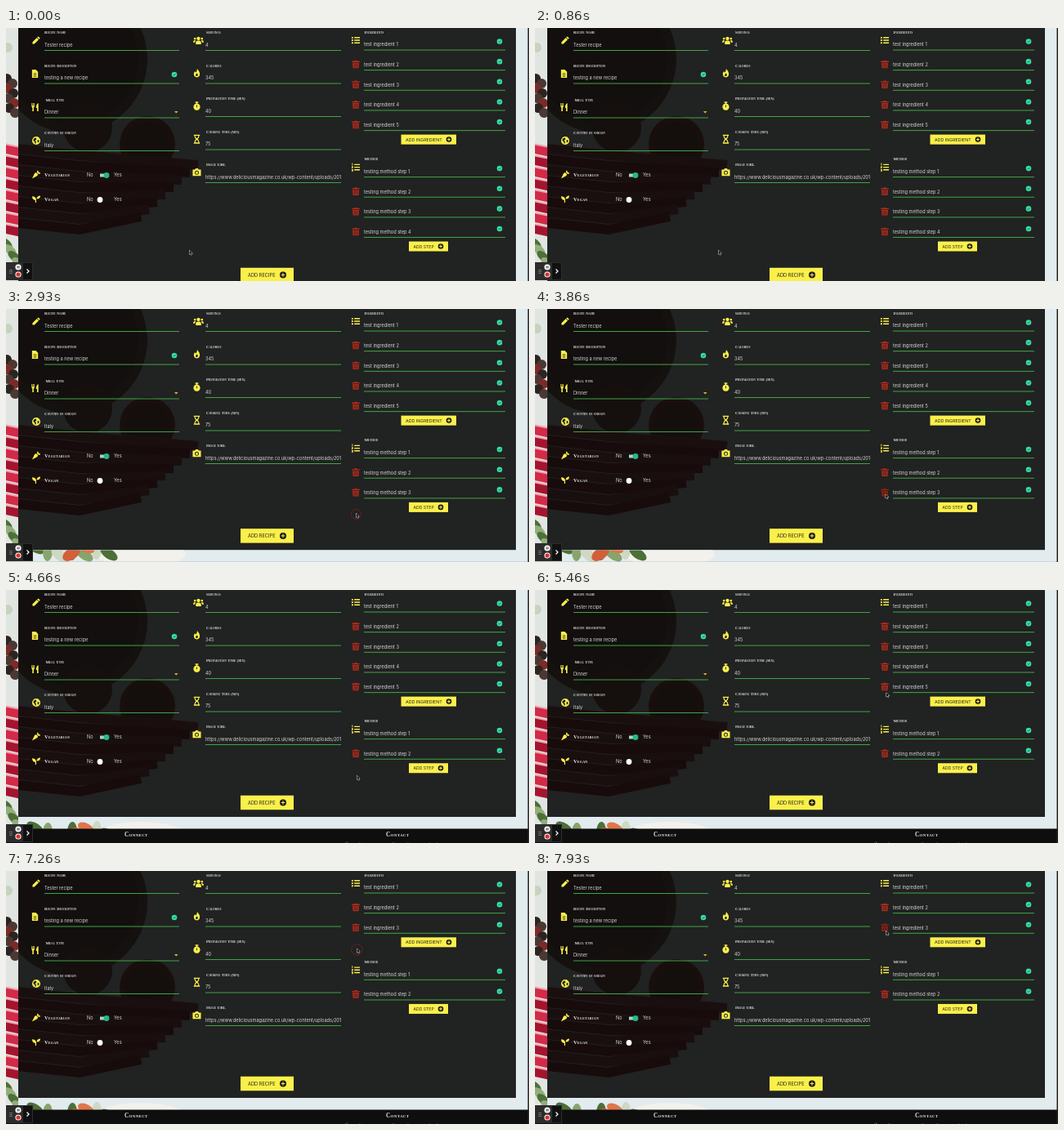
Recreate the animation shown at these times as an HTML page with a canvas. Size 640 by 310 pixels, loop 8 s.

```html
<!DOCTYPE html>
<html lang="en">
<head>
<meta charset="utf-8">
<title>Recipe form</title>
<style>
html, body { margin: 0; width: 100%; height: 100%; overflow: hidden; background: #111; }
canvas { display: block; width: 640px; height: 310px; }
</style>
</head>
<body>
<canvas id="stage"></canvas>
<script>
const W = 640, H = 310, LOOP = 8000, ROW = 24.65;
const YELLOW = '#fbf04a', GREEN = '#3fa544', TEAL = '#35dca4', TEXT = '#d4d4d4';
const SANS = 'Inter, sans-serif', SERIF = '"Liberation Serif", serif';
const canvas = document.getElementById('stage');
const ctx = canvas.getContext('2d');
const scale = window.devicePixelRatio || 1;
canvas.width = W * scale;
canvas.height = H * scale;

// Icons on a 24 unit grid
const icons = {
  pencil: 'M2 17V22h5L18.500 10.500l-5-5zM21.500 7.500a1.500 1.500 0 000-2l-3-3a1.500 1.500 0 00-2 0l-2 2 5 5z',
  file: 'M4 1h10l6 6v16H4zM8 11v1.500h8V11zM8 14.500V16h8v-1.500zM8 18v1.500h8V18z',
  fork: 'M3 1v8q0 3 2 4v10h3.500v-10q2-1 2-4V1H9v7H7.700V1H5.800v7H4.500V1zM21 1q-6 2-6 13h2.500v9H21z',
  globe: 'M12 1a11 11 0 100 22a11 11 0 100-22zM5 7l6-3 2 4-4 4 3 3-2 6-3-7-3-2zM15 11l4-1 1 4-4 4z',
  carrot: 'M1 23L8 8q4-2 7 1t0 6zM15 8q-2-4 0-7 4 1 3 5 4-1 5 3-4 3-8-1z',
  sprout: 'M1 5q10 0 11 9v8H9.500v-7Q1 14 1 5zM23 3q0 9-10 9 1-9 10-9z',
  users: 'M12 4a4 4 0 110 8a4 4 0 110-8zM6 21v-3q0-5 4-5h4q4 0 4 5v3zM4 6a2.500 2.500 0 110 5a2.500 2.500 0 110-5zM0 17q0-5 3-5h3q-2 2-2 5zM20 6a2.500 2.500 0 110 5a2.500 2.500 0 110-5zM24 17q0-5-3-5h-3q2 2 2 5z',
  fire: 'M13 0q6 6 7 13q0 10-8 10t-8-9q0-4 3-7q1 3 2 3q4-4 4-10zM12 20q4-1 3-5l-3-3q-4 3-3 6 1 2 3 2z',
  watch: 'M8 0h8v3h-2.500V5a9 9 0 11-3 0V3H8zM11 9v6h2V9z',
  glass: 'M4 0h16v3h-1.500q0 6-4 9q4 3 4 9H20v3H4v-3h1.500q0-6 4-9q-4-3-4-9H4zM8 3q0 5 4 7q4-2 4-7zM8 21h8q0-5-4-7q-4 2-4 7z',
  camera: 'M1 5h6l2-3h6l2 3h6v17H1zM12 8a5.500 5.500 0 100 11a5.500 5.500 0 100-11zM12 10a3.500 3.500 0 110 7a3.500 3.500 0 110-7z',
  bullets: 'M1 3h4v4H1zM8 3.500h15v3H8zM1 10h4v4H1zM8 10.500h15v3H8zM1 17h4v4H1zM8 17.500h15v3H8z',
  numbers: 'M2 1h2v6H2zM8 3.500h15v3H8zM1 9h4v3l-2 2h2v1H1v-2l2-2H1zM8 10.500h15v3H8zM1 17h4v6H1v-1.500h2v-1H1zM8 17.500h15v3H8z',
  trash: 'M1 3h7l1-2h6l1 2h7v3H1zM3 8h18l-1 15H4zM7 10v11h1.500V10zM11.300 10v11h1.500V10zM15.500 10v11H17V10z',
  arrow: 'M0 0V17l4-4 3 7 3-1.500-3-6.500h6z'
};
for (const name in icons) icons[name] = new Path2D(icons[name]);

function icon(name, x, y, size = 11, color = YELLOW) {
  ctx.save();
  ctx.translate(x - size / 2, y - size / 2);
  ctx.scale(size / 24, size / 24);
  ctx.fillStyle = color;
  ctx.fill(icons[name], 'evenodd');
  ctx.restore();
}

function rect(x, y, w, h, color) {
  ctx.fillStyle = color;
  ctx.fillRect(x, y, w, h);
}

function oval(x, y, rx, ry, color, turn = 0) {
  ctx.fillStyle = color;
  ctx.beginPath();
  ctx.ellipse(x, y, rx, ry, turn, 0, 7);
  ctx.fill();
}

function disc(x, y, r, color) {
  oval(x, y, r, r, color);
}

function line(points, color, width) {
  ctx.strokeStyle = color;
  ctx.lineWidth = width;
  ctx.beginPath();
  points.forEach(([x, y]) => ctx.lineTo(x, y));
  ctx.stroke();
}

// Runs paint inside a rectangle only
function clipped(x, y, w, h, paint) {
  ctx.save();
  ctx.beginPath();
  ctx.rect(x, y, w, h);
  ctx.clip();
  paint();
  ctx.restore();
}

// y is the middle of the line of text
function text(str, x, y, size = 5.6, color = TEXT, family = SANS, style = '') {
  ctx.font = `${style} ${size}px ${family}`;
  ctx.fillStyle = color;
  ctx.fillText(str, x, y + size * 0.35);
}

function caps(str, x, y, size = 4.8) {
  ctx.letterSpacing = size * 0.04 + 'px';
  text(str, x, y, size, '#e6e6e6', SERIF, 'small-caps bold');
  ctx.letterSpacing = '0px';
}

function tick(x, y) {
  disc(x, y, 3.3, TEAL);
  line([[x - 1.4, y], [x - 0.3, y + 1.1], [x + 1.5, y - 1]], '#175a45', 0.8);
}

function value(str, x, y, width) {
  clipped(x, y - 8, width, 16, () => text(str, x, y + 0.8));
  rect(x, y + 7, width, 1, GREEN);
}

function field(label, str, x, y, width) {
  caps(label, x + (x > 200 ? 1 : 0), y - 14.5);
  value(str, x, y, width);
}

function button(str, x, y, w, h, size) {
  rect(x, y - h / 2, w, h, YELLOW);
  text(str, x + (h > 14 ? 9 : 5.5), y + 0.3, size, '#222');
  const r = h > 14 ? 4 : 3.3, px = x + w - (h > 14 ? 13 : 9);
  disc(px, y, r, '#1a1a1a');
  rect(px - r * 0.6, y - 0.5, r * 1.2, 1, YELLOW);
  rect(px - 0.5, y - r * 0.6, 1, r * 1.2, YELLOW);
}

function toggle(label, name, y, on) {
  icon(name, 37, y - 0.5);
  caps(label, 47, y, 6.4);
  text('No', 99, y + 0.3);
  text('Yes', 132, y + 0.3);
  line([[115, y + 0.5], [125, y + 0.5]], on ? '#9fd8c6' : '#111', 4);
  disc(on ? 123 : 115, y + 0.5, 3.4, on ? '#26b78a' : '#fff');
}

// Soft shapes that shine through the dark panel
function backdrop() {
  disc(82, 38, 91, '#94796b');
  disc(82, 38, 80, '#7d6a64');
  disc(100, 122, 30, '#93685c');
  disc(173, 142, 34, '#a5665a');
  disc(173, 142, 27, '#8d6258');
  for (let i = 0; i < 8; i++) {
    const y = 148 + i * 13;
    line([[15, y], [90, y + 8], [235 - i * 10, y + 20 - i * 4]], i % 2 ? '#a04a52' : '#b5666a', 12);
  }
}

// Uncovered part of the photo left of the panel
function edge() {
  rect(0, 0, 15, H, '#e0e5e2');
  disc(2, 24, 6, '#c6d3bd');
  for (let i = 0; i < 8; i++) {
    disc(1 + i * 7 % 13, 62 + i * 6, 6, ['#2d2422', '#4a3833', '#7d2a26'][i % 3]);
  }
  for (let i = 0; i < 8; i++) {
    const y = 148 + i * 14;
    line([[-2, y], [17, y + 4]], i % 2 ? '#a5142f' : '#d32a48', 11);
    line([[-2, y - 6], [17, y - 2]], '#efa3ae', 2);
  }
  for (let i = 0; i < 4; i++) oval(i * 5, 264 + i * 8, 9, 5, i % 2 ? '#93ad7c' : '#4d7038', 0.7);
}

// Leaves below the panel
function leaves() {
  oval(165, 300, 55, 16, '#f3f1ec');
  for (let i = 0; i < 7; i++) {
    oval(36 + i * 15, 292 + i * 5 % 11, 12, 6, ['#4c7038', '#88a46c', '#cfd8c2'][i % 3], 0.6 + i % 2);
  }
  oval(80, 300, 12, 7, '#d3603a', -0.6);
  oval(98, 292, 11, 6, '#e0764a', 0.5);
}

function photo(bottom) {
  rect(0, 0, W, H, '#e2ebee');
  backdrop();
  rect(15, 0, 609, bottom, 'rgba(0,0,0,.855)');
  clipped(0, 0, 15, H, edge);
  clipped(15, bottom, 609, H, () => {
    rect(0, 0, W, H, '#e2ebee');
    leaves();
  });
}

function widget() {
  rect(0, 287, 33, 22, '#2c2c2c');
  rect(21, 288, 11, 20, '#111');
  for (let i = 0; i < 6; i++) rect(4.5 + i % 2 * 2, 296 + (i >> 1) * 2, 1, 1, '#aaa');
  disc(15, 293, 3.6, '#fff');
  rect(13.6, 291.5, 1, 3, '#333');
  rect(15.5, 291.5, 1, 3, '#333');
  disc(15, 302, 3.6, '#fff');
  disc(15, 302, 2.6, '#d9302c');
  line([[25.5, 295.5], [28, 298], [25.5, 300.5]], '#fff', 1.2);
}

function list(label, name, item, y, count, cursor) {
  caps(label, 438.5, y - 14.5);
  icon(name, 428, y - 4.5, 11);
  for (let i = 0; i < count; i++) {
    const ry = y + i * ROW;
    value(`${item} ${i + 1}`, 438, ry, 173);
    tick(604, ry - 3);
    if (i) {
      const over = Math.abs(cursor[0] - 428) < 6 && Math.abs(cursor[1] - ry) < 6;
      icon('trash', 428, ry + 0.4, 10.5, over ? '#96200f' : '#b82a1a');
    }
  }
  return y + (count - 1) * ROW;
}

// Cursor stops: time, x, y
const path = [
  [860, 224.5, 272.5], [1660, 424.5, 250], [2260, 428, 251], [2930, 428.5, 250.5],
  [3700, 429, 227], [4700, 429.5, 227.5], [5400, 430, 126.5],
  [5700, 429.5, 121], [6000, 429.5, 120], [6500, 429.5, 96.5], [7200, 429.5, 96],
  [7800, 429.5, 73.5]
];
const clicks = [2800, 4100, 5900, 7100];

function cursorAt(t) {
  const i = path.findIndex(p => p[0] > t);
  if (i < 0) return path[path.length - 1].slice(1);
  if (!i) return path[0].slice(1);
  const [a, b] = [path[i - 1], path[i]];
  const u = (t - a[0]) / (b[0] - a[0]), e = u * u * (3 - 2 * u);
  return [a[1] + (b[1] - a[1]) * e, a[2] + (b[2] - a[2]) * e];
}

function pointer([x, y], t) {
  const age = t - clicks.filter(c => c <= t).pop();
  if (age < 300) {
    ctx.globalAlpha = 1 - age / 500;
    ctx.strokeStyle = '#9a2020';
    ctx.lineWidth = 0.8;
    ctx.beginPath();
    ctx.arc(x, y + 1, 3.5 + age / 50, 0, 7);
    ctx.stroke();
    ctx.globalAlpha = 1;
  }
  ctx.save();
  ctx.translate(x, y);
  ctx.scale(0.28, 0.28);
  ctx.lineWidth = 3;
  ctx.strokeStyle = '#fff';
  ctx.stroke(icons.arrow);
  ctx.fillStyle = '#111';
  ctx.fill(icons.arrow);
  ctx.restore();
}

function draw(t) {
  const removed = clicks.filter(c => c <= t).length;
  const steps = 4 - Math.min(removed, 2);
  const ingredients = 5 - Math.max(removed - 2, 0);
  const cursor = cursorAt(t);
  const lastIngredient = 19.5 + (ingredients - 1) * ROW;
  const lastStep = lastIngredient + 57 + (steps - 1) * ROW;
  const submitY = Math.max(260.5, lastStep + 53.5);
  const bottom = submitY + 17.5;

  ctx.setTransform(scale, 0, 0, scale, 0, 0);
  photo(bottom);
  rect(0, bottom + 14.5, W, H, '#0e0e0e');
  caps('Connect', 145, bottom + 21, 7.3);
  caps('Contact', 465, bottom + 21, 7.3);
  text('If you have any questions please contact us', 415, bottom + 33.5, 5.9, '#999');
  rect(638.5, 0, 1.5, H, '#222');

  field('Recipe Name', 'Tester recipe', 47, 20, 165);
  field('Recipe Description', 'testing a new recipe', 47, 60.5, 165);
  field(' Meal Type', 'Dinner', 47, 102.5, 165);
  field('Country of Origin', 'Italy', 47, 143, 165);
  tick(206, 57);
  ctx.fillStyle = '#f0b429';
  ctx.fill(new Path2D('M206 102h4.500l-2.250 2.500z'));
  ['pencil', 'file', 'fork', 'globe'].forEach((n, i) => icon(n, i % 3 ? 35.5 : 37, 15 + i * 41));
  toggle('Vegetarian', 'carrot', 180, true);
  toggle('Vegan', 'sprout', 210, false);

  field('Servings', '4', 244, 20, 166);
  field('Calories', '345', 244, 60.5, 166);
  field('Preparation Time (min)', '40', 244, 101, 166);
  field('Cooking Time (min)', '75', 244, 141.5, 166);
  field('Image URL', 'https://www.deliciousmagazine.co.uk/wp-content/uploads/2018', 244, 182, 166);
  ['users', 'fire', 'watch', 'glass', 'camera'].forEach((n, i) =>
    icon(n, i ? 233.5 : 235.5, 15 + i * 40.4, i ? 11 : 13));

  list('Ingredients', 'bullets', 'test ingredient', 19.5, ingredients, cursor);
  button('ADD INGREDIENT', 483.5, lastIngredient + 18.5, 67.5, 12, 5.3);
  list('Method', 'numbers', 'testing method step', lastIngredient + 57, steps, cursor);
  button('ADD STEP', 493, lastStep + 18.5, 48, 12, 5.1);
  button('ADD RECIPE', 287, submitY, 65, 17.5, 5.7);

  widget();
  pointer(cursor, t);
}

function tickFrame(now) {
  draw(now % LOOP);
  requestAnimationFrame(tickFrame);
}
requestAnimationFrame(tickFrame);
</script>
</body>
</html>
```
